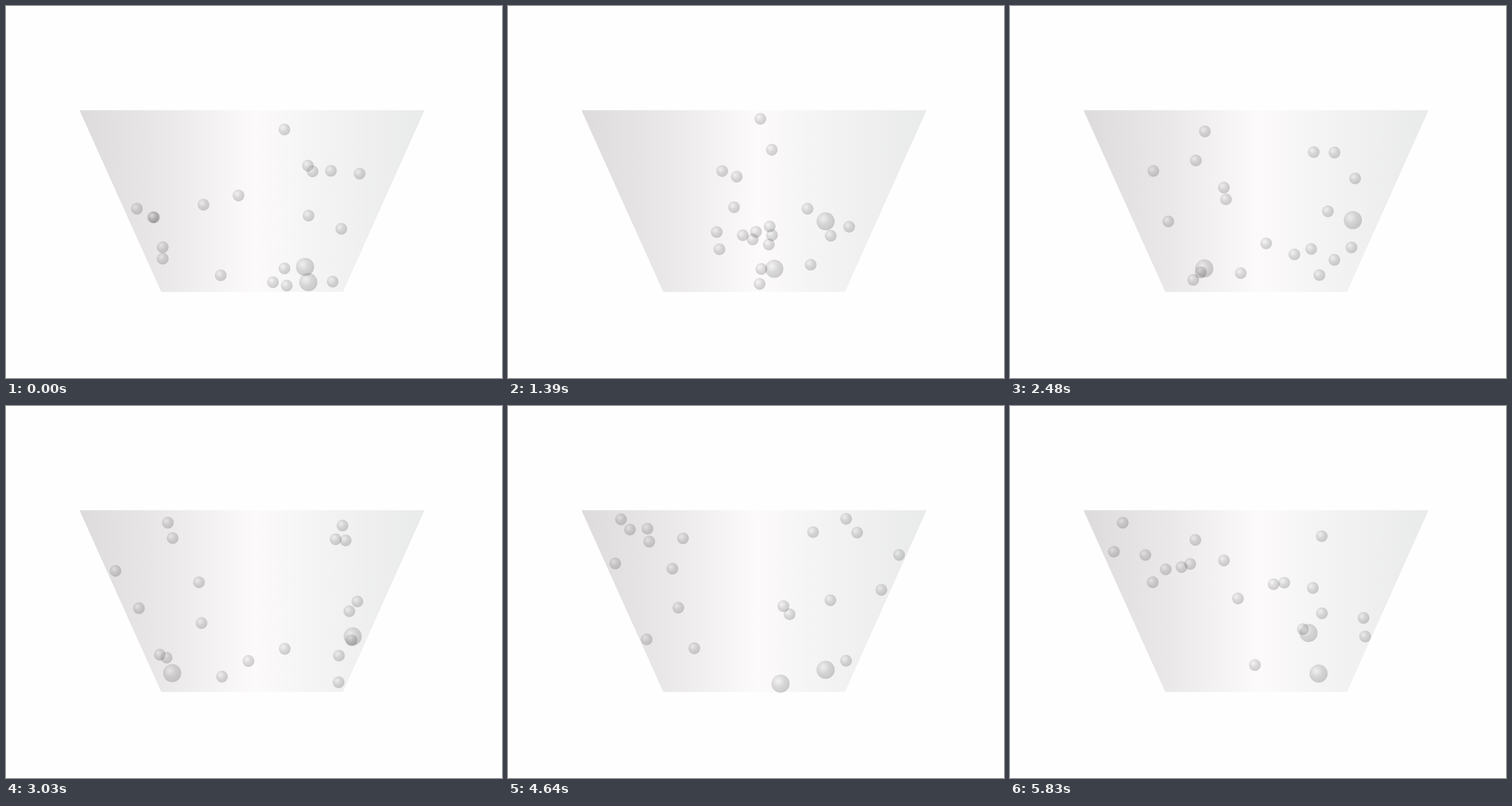
These frames come from a looping animation (864 px wide and 648 px high, 5.89 s). An HTML page with a canvas:

```html
<!DOCTYPE html>
<html lang="en">
<head>
<meta charset="utf-8">
<title>Particles in a vessel</title>
<style>
html, body { margin: 0; width: 100%; height: 100%; overflow: hidden; background: #fefefe; }
canvas { display: block; }
</style>
</head>
<body>
<canvas id="stage" width="864" height="648"></canvas>
<script>
const ctx = document.getElementById('stage').getContext('2d');
const LOOP = 5890, STEP = 47.15, LAST = 124;
const SMALL = 10.3, BIG = 15.8;
const CORNERS = [[128, 181.5], [729, 181.5], [587, 498], [270.5, 498]];
const MIDDLE = [428, 340];
const STARTS = [
  [485, 215], [526, 278], [534, 288], [566, 287], [616, 292], [405, 330], [344, 346],
  [228, 353], [256, 368], [258, 368], [527, 365], [584, 388], [273, 420], [273, 440],
  [374, 469], [485, 457], [465, 481], [489, 487], [569, 480]
];

let seed = 7;
function random() {
  seed = seed * 16807 % 2147483647;
  return seed / 2147483647;
}

// Each wall is a corner and the unit normal that points into the vessel.
const walls = CORNERS.map(([x, y], i) => {
  const [x2, y2] = CORNERS[(i + 1) % CORNERS.length];
  const length = Math.hypot(x2 - x, y2 - y);
  return { x, y, nx: (y - y2) / length, ny: (x2 - x) / length };
});

function bounce(p) {
  for (const w of walls) {
    const gap = (p.x - w.x) * w.nx + (p.y - w.y) * w.ny - SMALL;
    const speed = p.vx * w.nx + p.vy * w.ny;
    if (gap >= 0 || speed >= 0) continue;
    p.x -= 2 * gap * w.nx;
    p.y -= 2 * gap * w.ny;
    p.vx -= 2 * speed * w.nx;
    p.vy -= 2 * speed * w.ny;
  }
}

// A small ball sets off roughly towards the middle, then rebounds from the walls.
function track([x, y]) {
  const heading = Math.atan2(MIDDLE[1] - y, MIDDLE[0] - x) + (random() - .5) * 2;
  const speed = 3.5 + 3.5 * random();
  const p = { x, y, vx: speed * Math.cos(heading), vy: speed * Math.sin(heading) };
  const points = [[x, y]];
  while (points.length <= LAST) {
    p.x += p.vx;
    p.y += p.vy;
    bounce(p);
    points.push([p.x, p.y]);
  }
  return points;
}

const tracks = STARTS.map(track);

const wave = (step, top, period) => Math.cos((step - top) / period * 2 * Math.PI);

// Runs evenly to and fro between two limits, at the low one when step equals turn.
function shuttle(step, low, high, speed, turn) {
  const span = high - low;
  const way = Math.abs(step - turn) * speed % (2 * span);
  return low + Math.min(way, 2 * span - way);
}

function gradient(g, stops) {
  for (const [at, color] of stops) g.addColorStop(at, color);
  return g;
}

const glass = gradient(ctx.createLinearGradient(128, 0, 729, 0), [
  [0, '#dddbdc'], [.25, '#eae8e9'], [.51, '#fcfafb'], [.65, '#f6f5f6'], [.78, '#f1f1f1'], [1, '#e9eaea']
]);

function drawVessel() {
  ctx.fillStyle = glass;
  ctx.beginPath();
  for (const [x, y] of CORNERS) ctx.lineTo(x, y);
  ctx.fill();
}

function drawBall(r, x, y) {
  const lx = x - r * .28, ly = y - r * .3;
  ctx.fillStyle = gradient(ctx.createRadialGradient(lx, ly, 0, lx, ly, r * 1.4), [
    [0, 'rgba(0,0,0,.02)'], [.5, 'rgba(0,0,0,.13)'], [1, 'rgba(0,0,0,.19)']
  ]);
  ctx.beginPath();
  ctx.arc(x, y, r, 0, Math.PI * 2);
  ctx.fill();
}

function draw(t) {
  const step = Math.min(LAST, Math.floor((t % LOOP + 25) / STEP));
  ctx.fillStyle = '#fefefe';
  ctx.fillRect(0, 0, 864, 648);
  drawVessel();
  drawBall(BIG, 562 - 42 * wave(step, 4, 120), 412 - 50 * wave(step, 42, 102));
  drawBall(BIG, shuttle(step, 284, 577, 5.45, 63), 469 - 15 * wave(step, 42, 105));
  for (const points of tracks) drawBall(SMALL, ...points[step]);
}

const start = performance.now();
function tick() {
  draw(performance.now() - start);
  requestAnimationFrame(tick);
}
tick();
</script>
</body>
</html>
```
